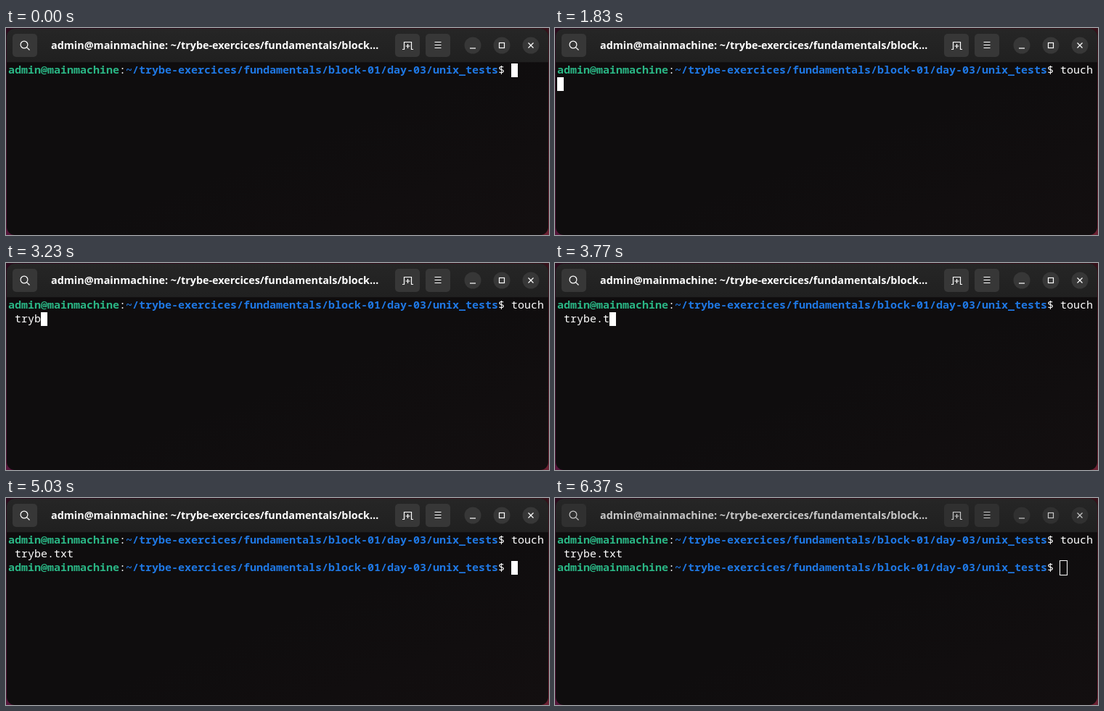
Recreate the animation shown at these times as an HTML page. Size 748 by 286 pixels, loop 6.43 s.

```html
<!DOCTYPE html>
<html lang="en">
<head>
<meta charset="utf-8">
<title>Terminal</title>
<style>
  html, body { margin: 0; width: 100%; height: 100%; overflow: hidden; background: #4b1430; }
  svg { display: block; width: 748px; height: 286px; }
  .title { font: bold 14.36px "Open Sans", "Noto Sans", sans-serif; }
  .term { font: 15px "Noto Sans Mono", "DejaVu Sans Mono", monospace; fill: #fff; white-space: pre; }
  .user { font-weight: bold; fill: #2ab685; }
  .path { font-weight: bold; fill: #1f78e4; }
  .icon { fill: none; stroke: currentColor; stroke-width: 1.2; }
</style>
</head>
<body>
<svg viewBox="0 0 748 286">
  <defs>
    <linearGradient id="wallpaper">
      <stop stop-color="#55163a"/><stop offset="1" stop-color="#6c2233"/>
    </linearGradient>
    <linearGradient id="shade" x2="0" y2="1">
      <stop stop-opacity=".5"/><stop offset="1" stop-opacity="0"/>
    </linearGradient>
    <linearGradient id="glass" x1="0" y1="0" x2="1" y2="1">
      <stop offset=".55" stop-color="#0f0d0e"/><stop offset="1" stop-color="#130f10"/>
    </linearGradient>
    <linearGradient id="bar" x2="0" y2="1">
      <stop stop-color="#262626"/><stop offset="1" stop-color="#202020"/>
    </linearGradient>
    <clipPath id="window"><rect x="1" y="1" width="746" height="285" rx="11"/></clipPath>
    <g id="prompt">
      <text class="term" x="3"><tspan class="user">admin@mainmachine</tspan>:<tspan class="path">~/trybe-exercices/fundamentals/block-01/day-03/unix_tests</tspan>$</text>
    </g>
  </defs>

  <rect width="748" height="286" fill="url(#wallpaper)"/>
  <rect width="748" height="286" fill="url(#shade)"/>
  <g clip-path="url(#window)">
    <rect width="748" height="286" fill="url(#glass)"/>
    <rect width="748" height="47" fill="url(#bar)"/>
    <path d="M0 47.5H748" stroke="#141213"/>
  </g>

  <g id="header">
    <g id="buttons" fill="#373737">
      <rect x="9" y="8" width="34" height="32" rx="5"/>
      <rect x="536" y="8" width="34" height="32" rx="5"/>
      <rect x="578" y="8" width="34" height="32" rx="5"/>
      <circle cx="643" cy="24" r="11.5"/>
      <circle cx="683" cy="24" r="11.5"/>
      <circle cx="723" cy="24" r="11.5"/>
    </g>
    <g class="icon">
      <circle cx="25" cy="23" r="4.9"/>
      <path d="M28.6 26.6L32.5 30.5"/>
      <path d="M546 29.5H548.5V19.5H558.5V29.5H561M553.5 22V28M550.5 25H556.5"/>
      <path d="M590.5 19.5H599.5M590.5 23.5H599.5M590.5 27.5H599.5"/>
      <path d="M639 28H647"/>
      <rect x="679.5" y="20.5" width="7" height="7"/>
      <path d="M719.5 20.5L726.5 27.5M726.5 20.5L719.5 27.5"/>
    </g>
    <text class="title" x="62" y="28.5" fill="currentColor">admin@mainmachine: ~/trybe-exercices/fundamentals/block…</text>
  </g>

  <use href="#prompt" y="63"/>
  <text class="term" id="line1" x="696" y="63"></text>
  <text class="term" id="line2" x="3" y="82"></text>
  <use href="#prompt" id="nextPrompt" y="101"/>
  <rect id="cursor" stroke="#fff"/>
</svg>
<script>
  const LOOP = 6430, ENTER = 5030, BLUR = 6230, DIMMED = 6370;
  const COMMAND = "touch trybe.txt";
  const KEY_TIMES = [630, 830, 1100, 1170, 1830, 2170, 2770, 2830, 2900,
                     3230, 3300, 3570, 3770, 4100, 4230];
  const COLUMNS = 82, PROMPT_COLUMNS = 77, CELL_W = 9, CELL_H = 19, LEFT = 3, TOP = 49;
  const $ = id => document.getElementById(id);

  function setAttributes(element, attributes) {
    for (const name in attributes) element.setAttribute(name, attributes[name]);
  }

  function drawCursor(column, row, hollow) {
    const grow = hollow ? 0.5 : 0;
    setAttributes($("cursor"), {
      x: LEFT + column * CELL_W - grow,
      y: TOP + row * CELL_H - grow,
      width: CELL_W + 2 * grow,
      height: CELL_H + 2 * grow,
      fill: hollow ? "none" : "#fff",
      "stroke-width": hollow ? 1 : 0
    });
  }

  function render(time) {
    const typed = COMMAND.slice(0, KEY_TIMES.filter(key => key <= time).length);
    const wrap = COLUMNS - PROMPT_COLUMNS;
    $("line1").textContent = typed.slice(0, wrap);
    $("line2").textContent = typed.slice(wrap);

    const entered = time >= ENTER;
    $("nextPrompt").style.display = entered ? "" : "none";
    const cell = PROMPT_COLUMNS + (entered ? 0 : typed.length);
    drawCursor(cell % COLUMNS, entered ? 2 : Math.floor(cell / COLUMNS), time >= BLUR);

    // The header dims in two steps once the window loses focus.
    const dim = (time >= BLUR) + (time >= DIMMED);
    $("header").style.color = ["#fff", "#e6e6e6", "#c8c8c8"][dim];
    $("buttons").setAttribute("fill", ["#373737", "#343434", "#303030"][dim]);
  }

  const start = performance.now();
  function tick() {
    render((performance.now() - start) % LOOP);
    requestAnimationFrame(tick);
  }
  tick();
</script>
</body>
</html>
```
